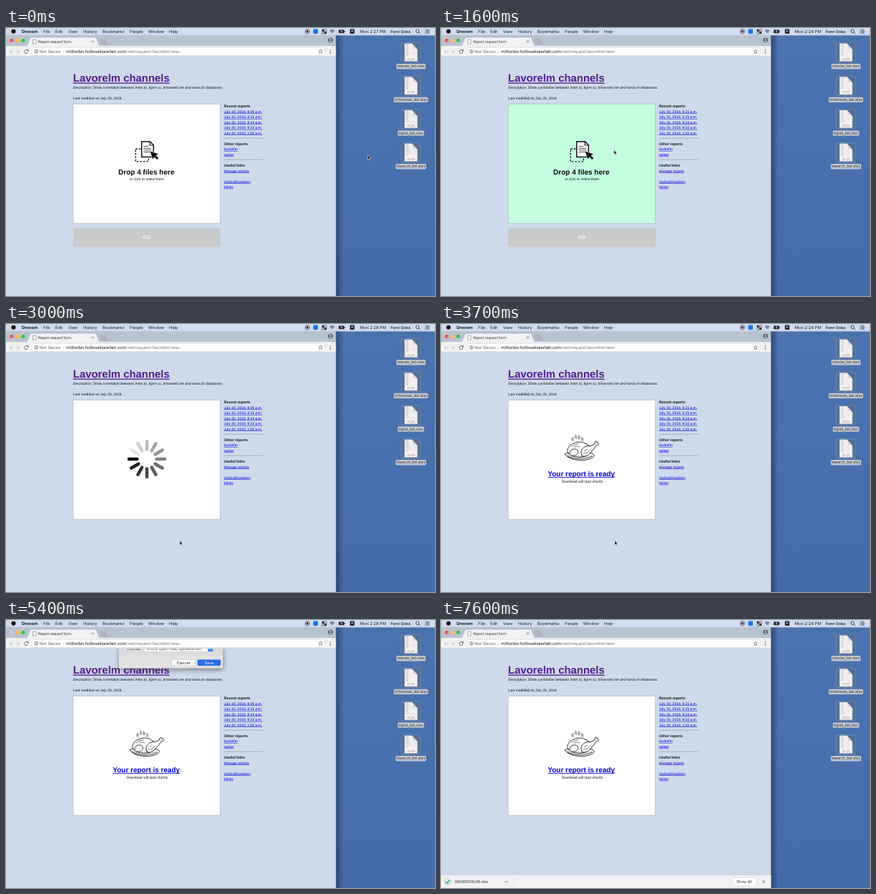
An HTML page with a canvas for the animation above (7800 ms loop, 600 by 375 pixels).

```html
<!DOCTYPE html>
<html lang="en">
<head>
<meta charset="utf-8">
<title>Report request form</title>
<style>
html, body { margin: 0; width: 100%; height: 100%; overflow: hidden; background: #cddaeb; }
canvas { display: block; width: 600px; height: 375px; }
</style>
</head>
<body>
<canvas id="stage"></canvas>
<script>
const canvas = document.getElementById('stage');
const c = canvas.getContext('2d');
const dpr = window.devicePixelRatio || 1;
canvas.width = 600 * dpr;
canvas.height = 375 * dpr;

const LOOP = 7800, STEP = 100;
const PAGE = '"Liberation Sans", Arial, sans-serif';
const UI = 'Inter, Roboto, sans-serif';
const WEB = 'Roboto, "Open Sans", sans-serif';
const LINK = '#0000e6';
const FILES = ['intento_list.xlsx', 'tchannels_list.xlsx', 'tlgrm_list.xlsx', 'tsearch_list.xlsx'];

const clamp = v => Math.max(0, Math.min(1, v));
const smooth = v => { v = clamp(v); return v * v * (3 - 2 * v); };
const ramp = (t, from, to) => smooth((t - from) / (to - from));

function box(x, y, w, h, fill, stroke, r = 0, lw = 0.6) {
  c.beginPath();
  c.roundRect(x, y, w, h, r);
  if (fill) { c.fillStyle = fill; c.fill(); }
  if (stroke) { c.strokeStyle = stroke; c.lineWidth = lw; c.stroke(); }
}

function dot(x, y, r, fill, stroke, lw = 0.7) {
  c.beginPath();
  c.arc(x, y, r, 0, 7);
  if (fill) { c.fillStyle = fill; c.fill(); }
  if (stroke) { c.strokeStyle = stroke; c.lineWidth = lw; c.stroke(); }
}

function path(points, stroke, lw = 0.8, fill, close) {
  c.beginPath();
  for (let i = 0; i < points.length; i += 2) c.lineTo(points[i], points[i + 1]);
  if (close) c.closePath();
  if (fill) { c.fillStyle = fill; c.fill(); }
  if (stroke) { c.strokeStyle = stroke; c.lineWidth = lw; c.stroke(); }
}

function curve(d, lw = 0.9, fill) {
  const p = new Path2D(d);
  if (fill) { c.fillStyle = fill; c.fill(p); }
  c.strokeStyle = '#161616';
  c.lineWidth = lw;
  c.stroke(p);
}

// y is the vertical middle of the capitals
function text(s, x, y, size, color = '#111', family = PAGE, style = '', align = 'left') {
  c.font = `${style} ${size}px ${family}`;
  c.textAlign = align;
  c.fillStyle = color;
  c.fillText(s, x, y + size * 0.33);
  return c.measureText(s).width;
}

function link(s, x, y, size = 5, color = LINK, style = '', align = 'left') {
  const w = text(s, x, y, size, color, PAGE, style, align);
  const left = align === 'center' ? x - w / 2 : x;
  c.fillStyle = color;
  c.fillRect(left, y + size * 0.42, w, Math.max(0.5, size * 0.09));
}

function drawDesktop() {
  const g = c.createLinearGradient(0, 0, 0, 375);
  g.addColorStop(0, '#4a73af');
  g.addColorStop(1, '#466ca8');
  c.fillStyle = g;
  c.fillRect(461, 0, 139, 375);
  const s = c.createLinearGradient(461, 0, 472, 0);
  s.addColorStop(0, 'rgba(15,30,65,.5)');
  s.addColorStop(1, 'rgba(15,30,65,0)');
  c.fillStyle = s;
  c.fillRect(461, 10, 11, 365);
}

function drawMenuBar(t) {
  box(0, 0, 600, 10.3, '#cfdcf0');
  c.fillStyle = '#a9b5c8';
  c.fillRect(0, 9.8, 600, 0.5);
  dot(10.5, 4.8, 3, '#111');
  text('Drovem', 22, 4.7, 5.9, '#111', UI, 'bold');
  [['File', 52], ['Edit', 69], ['View', 87], ['History', 108], ['Bookmarks', 135],
   ['People', 173], ['Window', 199], ['Help', 228]].forEach(([s, x]) => text(s, x, 4.7, 5.75, '#1a1a1a', UI));
  dot(421.5, 4.8, 3, null, '#222');
  dot(421.5, 4.8, 1.5, '#222');
  box(429.8, 1.6, 6.4, 6.4, '#1673e6', null, 1);
  box(441.8, 1.8, 2.9, 2.9, '#222');
  box(445.4, 1.8, 2.9, 2.9, null, '#222', 0, 0.5);
  box(441.8, 5.2, 2.9, 2.9, null, '#222', 0, 0.5);
  box(445.4, 5.2, 2.9, 2.9, '#222');
  for (const r of [1.6, 3.2, 4.8]) {
    c.beginPath();
    c.arc(456.3, 7.6, r, -2.35, -0.8);
    c.strokeStyle = '#222';
    c.lineWidth = 0.8;
    c.stroke();
  }
  box(465.5, 2.8, 7.4, 4.2, '#222', '#222', 0.8, 0.5);
  box(473.4, 4.2, 0.8, 1.5, '#222');
  path([470, 2.6, 467.6, 5.2, 469.3, 5.2, 468.4, 7.3, 470.9, 4.6, 469.3, 4.6], null, 0, '#cfdcf0', true);
  box(481, 1.6, 6.4, 6.4, '#222', null, 1);
  text('A', 484.2, 4.8, 5, '#fff', UI, '', 'center');
  text(t < 500 ? 'Mon 2:27 PM' : 'Mon 2:28 PM', 495, 4.7, 5.8, '#1a1a1a', UI);
  text('Fenn Oska', 538, 4.7, 5.5, '#1a1a1a', UI, '500');
  dot(575.5, 4.2, 2.2, null, '#222', 0.8);
  path([577.1, 5.8, 579, 7.8], '#222', 0.9);
  for (let i = 0; i < 3; i++) {
    box(586, 2.4 + i * 2.1, 0.9, 0.8, '#222');
    box(587.6, 2.4 + i * 2.1, 4.6, 0.8, '#222');
  }
}

// height of the save sheet below the toolbar
const SHEET = 88;
const sheetShown = t => SHEET * (ramp(t, 4198, 4498) - ramp(t, 5212, 5512));

function drawBrowser(t) {
  box(0, 10.3, 461.5, 15.2, '#b9c2cf');
  dot(8, 17.3, 2.6, sheetShown(t) > 0 ? '#c9ced6' : '#fc5b57');
  dot(16, 17.3, 2.6, '#fdbc40');
  dot(24, 17.3, 2.6, '#34c84a');
  path([29, 25.5, 34, 13, 126, 13, 131, 25.5], '#9da4ae', 0.5, '#f1f2f4');
  box(37.5, 16.2, 4.4, 6, '#fff', '#777', 0, 0.6);
  text('Report request form', 45, 19.2, 5.2, '#333', WEB);
  path([119.8, 17.4, 123, 20.6], '#555', 0.7);
  path([123, 17.4, 119.8, 20.6], '#555', 0.7);
  path([130.5, 16, 139, 16, 142, 22.5, 133.5, 22.5], '#9ba3ad', 0.4, '#adb4bf', true);
  dot(453.8, 17, 3.3, '#58606c');
  dot(453.8, 16, 1.2, '#c7ccd4');
  box(451.9, 17.7, 3.8, 1.5, '#c7ccd4', null, 0.7);

  box(0, 25.3, 461.5, 14.7, '#f1f2f3');
  c.fillStyle = '#b7bcc5';
  c.fillRect(0, 39.6, 461.5, 0.5);
  path([8, 30.2, 5, 33, 8, 35.8], '#c3c4c6', 0.9);
  path([5, 33, 10, 33], '#c3c4c6', 0.9);
  path([16, 30.2, 19, 33, 16, 35.8], '#c3c4c6', 0.9);
  path([14, 33, 19, 33], '#c3c4c6', 0.9);
  c.beginPath();
  c.arc(28.5, 33, 2.6, 0.5, 5.6);
  c.strokeStyle = '#555';
  c.lineWidth = 0.9;
  c.stroke();
  path([31.4, 29.6, 31.4, 32.4, 28.8, 32.4], null, 0, '#555', true);
  box(36.5, 27.3, 409.5, 11.2, '#fff', '#cdced1', 1.5);
  dot(42.3, 32.8, 2.4, null, '#555', 0.7);
  box(42, 32.3, 0.7, 1.9, '#555');
  box(42, 31.2, 0.7, 0.7, '#555');
  text('Not Secure', 47, 32.8, 6, '#666', WEB);
  box(80.4, 30, 0.5, 6, '#ccc');
  const w = text('miltordev.hollowelsewhen.com', 84.3, 32.8, 6.1, '#222', WEB);
  text('/webrequest/lavorelm/new/', 84.3 + w, 32.8, 6.1, '#777', WEB);
  const star = [];
  for (let i = 0; i < 10; i++) {
    const a = -Math.PI / 2 + i * Math.PI / 5, r = i % 2 ? 1.4 : 3;
    star.push(440 + r * Math.cos(a), 33 + r * Math.sin(a));
  }
  path(star, '#555', 0.6, null, true);
  for (let i = 0; i < 3; i++) dot(453.7, 30.8 + i * 2.2, 0.7, '#555');
}

function drawPage() {
  box(0, 40, 461.5, 335, '#cddaeb');
  link('Lavorelm channels', 93.8, 70.2, 14.9, '#551a8b', 'bold');
  text('Description: Show correlation between inten.to, tlgrm.ru, tchannels.me and tsear.ch databases.', 93.8, 83, 5, '#111', PAGE, 'italic');
  text('Last modified on July 29, 2018', 93.8, 98, 5);
  const head = (s, y) => text(s, 305, y, 5.2, '#111', PAGE, 'bold');
  const rule = y => box(305, y, 55, 0.6, '#9a9fa6');
  head('Recent reports', 109.7);
  ['9:25', '9:25', '9:24', '9:22', '1:02'].forEach((h, i) =>
    link(`July 30, 2018, ${h} ${i < 4 ? 'p' : 'a'}.m.`, 305, 117.3 + i * 7.5));
  rule(153.8);
  head('Other reports', 162.2);
  link('lavorelm', 305, 169.8);
  link('vorlan', 305, 177.4);
  rule(183.8);
  head('Useful links', 192.4);
  link('Manage reports', 305, 200);
  link('HollowElsewhen', 305, 215);
  link('tolvex', 305, 222.6);
}

function drawDropHint() {
  c.setLineDash([2.6, 1.9]);
  box(181.3, 169.3, 18, 17.6, null, '#111', 0, 1.4);
  c.setLineDash([]);
  path([189.7, 159, 201.5, 159, 206.3, 163.8, 206.3, 180.5, 189.7, 180.5], '#111', 1.5, '#fff', true);
  path([201.2, 159, 201.2, 164, 206.3, 164], '#111', 1.1);
  for (let i = 0; i < 4; i++) box(192.5, 165.3 + i * 2.6, i ? 10.5 : 6.5, 0.8, '#222');
  path([201, 172, 213.5, 176.2, 210, 178.4, 213.6, 182, 211.2, 184.4, 207.6, 180.8, 205.3, 184.2], '#fff', 0.6, '#111', true);
  text('Drop 4 files here', 196.3, 201.5, 10, '#0c0c0c', PAGE, 'bold', 'center');
  text('or click to select them', 197, 211.5, 5, '#111', PAGE, '', 'center');
}

function drawSpinner(t) {
  const head = 6 + Math.round((t - 3000) / 1000 * 12);
  c.lineCap = 'round';
  for (let i = 0; i < 12; i++) {
    const age = (((head - i) % 12) + 12) % 12;
    const a = i * Math.PI / 6;
    const v = Math.round(12 + age * 19.5);
    const cx = Math.cos(a), sy = Math.sin(a);
    path([197 + 13.5 * cx, 189 + 13.5 * sy, 197 + 25 * cx, 189 + 25 * sy], `rgb(${v},${v},${v})`, 4.6);
  }
  c.lineCap = 'butt';
}

function drawRoast() {
  c.lineJoin = c.lineCap = 'round';
  curve('M173.5 182 C172 177 219 178 214 185 C209 193 179 193 173.5 182 Z', 0.9, '#fff');
  curve('M176.5 184 C183 191 206 190 211 185', 0.7);
  curve('M178 181 C174 174 181 167 190 165.5 C202 163 212 172 208 181 C202 188 184 188 178 181 Z', 0.9, '#fff');
  curve('M197 184 C193 177 200 170 207 170.5 C210 171 212 169 215 167.5 C214 164 218 163.5 218.2 166 C221.5 165.5 221 169.5 217.5 169.5 C215 173 213 176 209 180 C206 184 201 187 197 184 Z', 0.9, '#fff');
  curve('M180 182 C179 176 186 173 190 176 C194 180 190 185 184 184', 0.8);
  curve('M182 172 C185 169 188 168 192 168 M186 172 C189 170.5 192 171 194 172 M199 181 C202 182 206 180 208 176 M201 178 L204 175', 0.6);
  // garnish along the rim
  for (let i = 0; i < 9; i++) {
    const x = 177 + i * 4;
    curve(`M${x} ${185.5 + 2 * Math.sin(i * Math.PI / 8)} q1 -2.4 2.4 -.2`, 0.6);
  }
  for (const [x, y] of [[183.5, 163], [188, 160], [192.5, 160.5], [197, 163]])
    curve(`M${x} ${y} c-2 -1.8 1.4 -2.8 0 -4.8 m1.2 5 c1.2 -1.2 -.6 -2 .3 -3.4`, 0.7);
  c.lineJoin = 'miter';
  c.lineCap = 'butt';
}

function drawPanel(t) {
  const green = t >= 1200 && t < 2600;
  box(94, 106.4, 205.6, 167, green ? '#c4ffe1' : '#fff', '#b4b8be', 0, 0.7);
  if (t < 2600) {
    drawDropHint();
    box(93.8, 280, 206.4, 26.6, '#c9c9ca', null, 2);
    text('GO', 197, 293.2, 6.6, '#fff', PAGE, 'bold', 'center');
  } else if (t < 3600) {
    drawSpinner(t);
  } else {
    drawRoast();
    link('Your report is ready', 196.2, 209.8, 9.95, LINK, 'bold', 'center');
    text('Download will start shortly', 197.3, 220, 5, '#111', PAGE, '', 'center');
  }
}

function drawFile(name, x, y, ghost) {
  if (!ghost) box(x - 13.5, y - 13.8, 27, 27, 'rgba(90,108,138,.6)', 'rgba(140,158,186,.8)', 1.5);
  const l = x - 8.9, r = x + 8.9, top = y - 12.7, low = y + 12;
  path([l, top, x + 1.5, top, r, y - 4.5, r, low, l, low], '#b9bcc2', 0.4, '#f3f3f4', true);
  for (let i = 0; i < 7; i++) {
    box(l + 1.8, y - 10.5 + i * 2.3, i < 3 ? 7 : 14, 0.4, '#cfd1d4');
    box(l + 1.8, y - 11 + i * 2.3, 3.5, 0.6, '#a9abad');
  }
  const curl = new Path2D(`M${x + 1.5} ${top} Q${x + 4.4} ${y - 10} ${x + 2.8} ${y - 6} Q${x + 6.5} ${y - 6.8} ${r} ${y - 4.5} Z`);
  c.fillStyle = '#d9dade';
  c.fill(curl);
  c.strokeStyle = '#b5b7bb';
  c.lineWidth = 0.4;
  c.stroke(curl);
  text('XLSX', x, y + 9, 4.2, '#8c8c8e', UI, '', 'center');
  c.font = `500 5.2px ${UI}`;
  const w = c.measureText(name).width + 2.5;
  box(x - w / 2, y + 15.6, w, 7.4, ghost ? '#3f7fd8' : '#c3c7cf', null, 1.6);
  text(name, x, y + 19.2, 5.2, ghost ? '#fff' : '#3b4047', UI, '500', 'center');
}

function drawSheet(t) {
  const shown = sheetShown(t);
  if (shown < 0.5) return;
  const b = 40 + shown;
  const active = t >= 4500;
  c.save();
  c.beginPath();
  c.rect(140, 40.2, 180, 150);
  c.clip();
  c.shadowColor = 'rgba(0,0,0,.45)';
  c.shadowBlur = 7 * dpr;
  c.shadowOffsetY = 2 * dpr;
  box(157.5, b - SHEET, 146, SHEET, '#e2e2e3');
  c.shadowColor = 'transparent';
  box(157.5, b - SHEET, 146, SHEET, null, '#aaa', 0, 0.5);
  box(158, b - 39, 145, 21, '#dcdcdd');
  const label = (s, x, y) => text(s, x, y, 5.6, '#222', UI, '', 'right');
  const arrows = (x, y) => {
    if (active) box(x - 3.4, y - 4, 6.8, 8, '#2470ee', null, 1.2);
    const ink = active ? '#fff' : '#444';
    path([x - 1.4, y - 0.9, x, y - 2.4, x + 1.4, y - 0.9], ink, 0.7);
    path([x - 1.4, y + 0.9, x, y + 2.4, x + 1.4, y + 0.9], ink, 0.7);
  };
  const field = (x, y, w, r) => box(x, y - 4.1, w, 8.2, '#fff', '#bcbcbe', r, 0.5);
  const button = (s, x, on) => {
    box(x, b - 12, 32, 8, on ? '#2470ee' : '#fff', on ? '#1b5fcc' : '#bebec0', 1.5, 0.5);
    text(s, x + 16, b - 8, 5.7, on ? '#fff' : '#222', UI, '', 'center');
  };
  label('Save As:', 182.5, b - 74);
  field(185, b - 74, 104, 0);
  text('XEHMXZHLVB', 187, b - 74, 5.5, '#222', UI);
  label('Tags:', 182.5, b - 61);
  field(185, b - 61, 104, 0);
  label('Where:', 182.5, b - 48.5);
  field(185, b - 48.5, 104, 1.5);
  box(188.5, b - 50.8, 5.6, 4.6, '#4aa8e8', null, 0.6);
  text('Downloads', 196, b - 48.5, 5.5, '#222', UI);
  arrows(285, b - 48.5);
  label('Format:', 189.5, b - 27.6);
  field(193, b - 27.6, 97, 1.5);
  text('Office Open XML spreadsheet', 196.5, b - 27.6, 5.4, '#222', UI);
  arrows(285.8, b - 27.6);
  button('Cancel', 232, false);
  button('Save', 268, active);
  c.restore();
}

function drawShelf(t) {
  const up = ramp(t, 5750, 6050);
  if (!up) return;
  c.save();
  c.translate(0, 18.5 * (1 - up));
  box(0, 356.8, 461.5, 19, '#f1f2f3');
  c.fillStyle = '#bdc1c8';
  c.fillRect(0, 356.5, 461.5, 0.5);
  c.globalAlpha = t > 6500 && t < 7500 ? 0.65 + 0.35 * Math.cos((t - 6500) / 250 * Math.PI) : 1;
  dot(9.3, 366, 5, '#dbe9e2', '#b9cdc3', 0.7);
  path([6.8, 366, 8.7, 368, 12, 363.9], '#22915f', 1.2);
  c.globalAlpha = 1;
  text('XEHMXZHLVB.xlsx', 19.3, 366.3, 5.5, '#333', WEB);
  for (let i = 0; i < 3; i++) dot(89.8 + i * 1.8, 366.3, 0.6, '#555');
  box(101, 360, 0.5, 12, '#ccc');
  box(407, 360.3, 34, 11.6, '#fff', '#cfd0d2', 1.5);
  text('Show All', 424, 366.2, 5.6, '#333', WEB, '', 'center');
  path([449.6, 364.4, 453.2, 368], '#555', 0.8);
  path([453.2, 364.4, 449.6, 368], '#555', 0.8);
  c.restore();
}

// time, x, y of the pointer at each rest
const ROUTE = [[0, 506, 178], [400, 562, 129.5], [450, 562, 129.5], [870, 337, 147],
  [1000, 337, 147], [1400, 242, 170.7], [1700, 242, 170.7], [2300, 243, 303.3]];

function pointer(t) {
  let at = ROUTE[0];
  for (const next of ROUTE) {
    if (t < next[0]) {
      const k = ramp(t, at[0], next[0]);
      return [at[1] + (next[1] - at[1]) * k, at[2] + (next[2] - at[2]) * k];
    }
    at = next;
  }
  return [at[1], at[2]];
}

function drawDrag(t) {
  if (t < 450 || t >= 1400) return;
  const [x, y] = pointer(t);
  c.globalAlpha = 0.75;
  FILES.forEach((f, i) => drawFile(f, x + 4, y - 95.5 + i * 46.7, true));
  c.globalAlpha = 1;
  dot(x + 22, y + 6.8, 4, '#f0323c');
  text('4', x + 22, y + 6.8, 5, '#fff', UI, '', 'center');
  if (x < 461) {
    dot(x + 3.5, y + 8.5, 4, '#27b03a');
    path([x + 1.2, y + 8.5, x + 5.8, y + 8.5], '#fff', 1);
    path([x + 3.5, y + 6.2, x + 3.5, y + 10.8], '#fff', 1);
  }
}

function drawPointer(t) {
  if (t >= 5000) return;
  const [x, y] = pointer(t);
  path([x, y, x, y + 6, x + 1.3, y + 4.8, x + 2.3, y + 7, x + 3.3, y + 6.5, x + 2.4, y + 4.4, x + 4.2, y + 4.3],
    '#e8edf5', 0.6, '#080808', true);
}

function draw(t) {
  c.setTransform(dpr, 0, 0, dpr, 0, 0);
  c.textRendering = 'geometricPrecision';
  drawDesktop();
  FILES.forEach((f, i) => drawFile(f, 566.4, 34.4 + i * 46.7, false));
  drawPage();
  drawPanel(t);
  drawSheet(t);
  drawBrowser(t);
  drawShelf(t);
  drawMenuBar(t);
  drawDrag(t);
  drawPointer(t);
}

const start = performance.now();
function tick() {
  const t = (performance.now() - start) % LOOP;
  draw(Math.min(LOOP - 2 * STEP, Math.floor(t / STEP) * STEP));
  requestAnimationFrame(tick);
}
tick();
</script>
</body>
</html>
```
